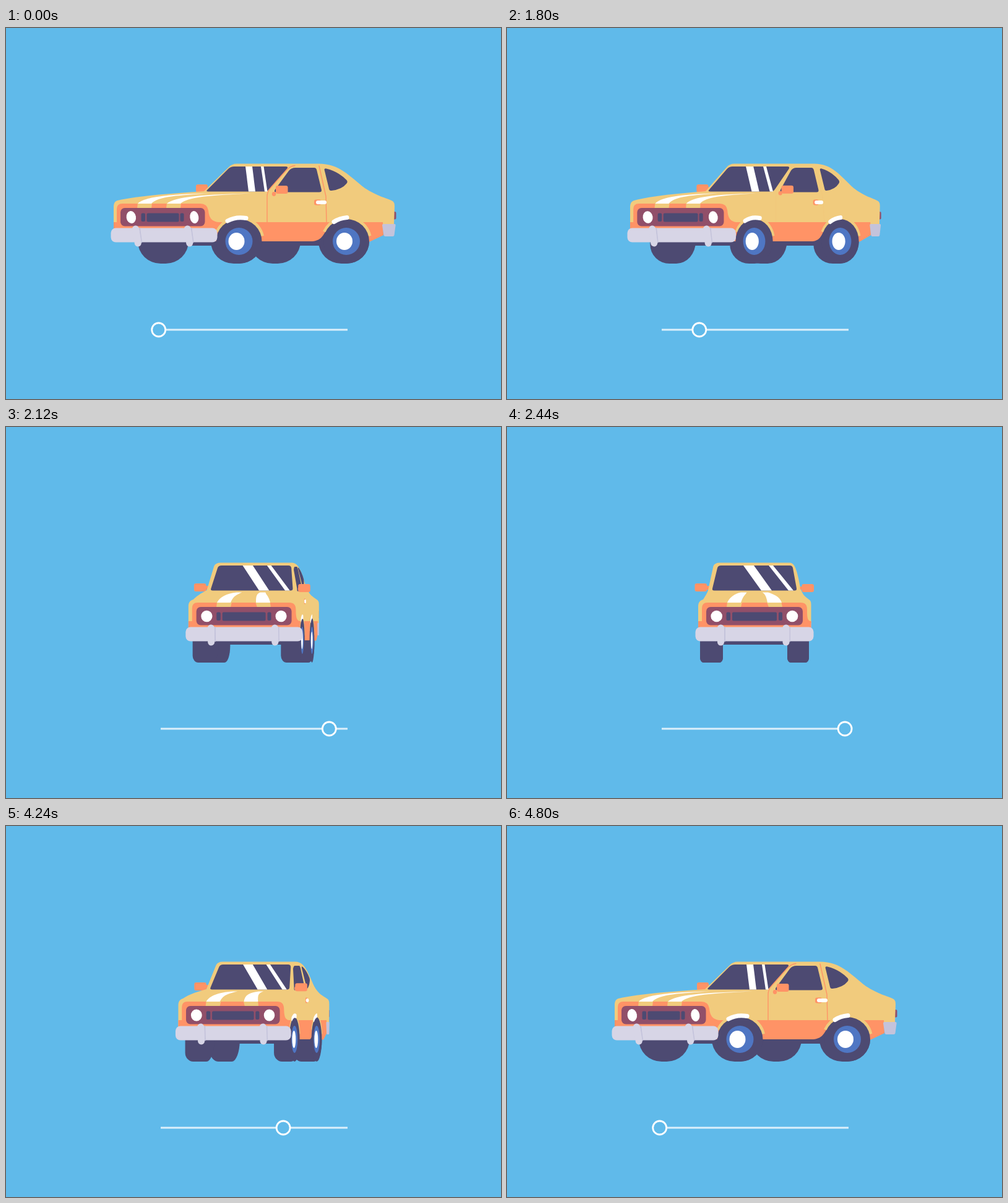
Animation, 800 px wide and 600 px high, one loop 4840 ms. Source, as an HTML page with a canvas:

```html
<!DOCTYPE html>
<html lang="en">
<head>
<meta charset="utf-8">
<title>Turning car</title>
<style>
  html, body { margin: 0; width: 100%; height: 100%; overflow: hidden; background: #60baea; }
  canvas { display: block; width: 800px; height: 600px; }
</style>
</head>
<body>
<canvas id="stage" width="800" height="600"></canvas>
<script>
const ctx = document.getElementById('stage').getContext('2d');
const LOOP = 4840, STEP = 40, TURN = 1000, GO = 1440, BACK = 3800;
const SKY = '#60baea', YELLOW = '#f1cb7d', ORANGE = '#ff9366', DARK = '#4d4a72',
      MAROON = '#914f69', SILVER = '#d7d5e6', SHADE = '#c4c3db', BLUE = '#4f76c3', WHITE = '#fff';

let turn = 0; // 0 = side view, 1 = front view

const mix = (a, b) => a + (b - a) * turn;

// Timing curve from (0,0) to (1,1) with control points (x1,0) and (x2,1)
function ease(u, x1, x2) {
  if (u <= 0) return 0;
  if (u >= 1) return 1;
  let lo = 0, hi = 1;
  for (let i = 0; i < 30; i++) {
    const s = (lo + hi) / 2, r = 1 - s;
    if (3 * r * r * s * x1 + 3 * r * s * s * x2 + s * s * s < u) lo = s; else hi = s;
  }
  return lo * lo * (3 - 2 * lo);
}

// Path text where "a:b" means side value a turning into front value b
const path = d => new Path2D(d.replace(/([\d.]+):([\d.]+)/g, (_, a, b) => mix(+a, +b).toFixed(3)));

function fill(color, d) {
  ctx.fillStyle = color;
  ctx.fill(path(d));
}

function line(color, width, d) {
  ctx.strokeStyle = color;
  ctx.lineWidth = width;
  ctx.stroke(path(d));
}

function box(color, left, right, top, bottom, r) {
  const w = Math.max(0, right - left);
  ctx.fillStyle = color;
  ctx.beginPath();
  ctx.roundRect(left, top, w, bottom - top, Math.min(r, w / 2));
  ctx.fill();
}

function oval(color, x, y, rx, ry, tilt = 0) {
  ctx.fillStyle = color;
  ctx.beginPath();
  ctx.ellipse(x, y, rx, ry, tilt, 0, Math.PI * 2);
  ctx.fill();
}

// Lower half of a tyre with elliptical bottom corners
function tyre(left, right) {
  const rx = mix(37, 6), low = 381, top = 345;
  const ryL = mix(36, 8), ryR = 36 - 28 * turn ** 10;
  ctx.fillStyle = DARK;
  ctx.beginPath();
  ctx.moveTo(left, top);
  ctx.lineTo(left, low - ryL);
  ctx.ellipse(left + rx, low - ryL, rx, ryL, 0, Math.PI, Math.PI / 2, true);
  ctx.lineTo(right - rx, low);
  ctx.ellipse(right - rx, low - ryR, rx, ryR, 0, Math.PI / 2, 0, true);
  ctx.lineTo(right, top);
  ctx.fill();
}

// Arch, side wall and hub, flattened as the car turns
function wheel(x, capShift, shine) {
  if (turn > 0.995) return;
  ctx.save();
  ctx.translate(x, 345);
  ctx.scale(1 - turn, 1);
  ctx.fillStyle = YELLOW;
  ctx.beginPath();
  ctx.moveTo(0, 0);
  ctx.ellipse(0, 0, 41.5, 40.5, 0, Math.PI + 0.42, -0.23);
  ctx.fill();
  oval(DARK, 0, 0, 37, 36);
  oval(BLUE, 0, 0, 22, 22);
  oval(WHITE, capShift, 0, 13, 14);
  ctx.strokeStyle = WHITE;
  ctx.lineWidth = 7;
  ctx.stroke(new Path2D(shine));
  ctx.restore();
}

function underside(bump) {
  box(DARK, mix(285, 335), mix(520, 470), 338, 352, 0);
  tyre(mix(394, 312), mix(476, 349));
  tyre(mix(213, 312), mix(295, 349));
  box(DARK, mix(505, 453), mix(550, 488), 322, 346, 0);
  tyre(mix(505, 453), mix(587, 488));
  tyre(mix(331, 453) + 11 * bump, mix(413.5, 488) + 3.5 * bump);
}

function shell() {
  // far mirror, tail light
  box(ORANGE, mix(307, 303.5), mix(326, 323), 253, 266, 3);
  box(ORANGE, mix(318, 320), mix(326, 328), 257, 263, 1);
  box(MAROON, mix(624, 489), mix(630.5, 491), 297, 309.5, 2);

  fill(YELLOW, `M174:309 325 V291 C174:309 284 175:311 281 180:317 279
    C215:322 271 270:324 267.5 320:325 264 L360:333.5 225 Q365:335.5 219.5 373:344 219.5
    H505:457 C540:467 219.5 555:470 240 580:474 259 C600:477 272 615:483 275 623:488 279
    C627:491 281 628:491.5 283 628:491.5 288 L627:491.5 318 H588:491 V325 Z`);

  // lower side
  fill(ORANGE, `M335:488 314 H609:491.5 L610:491.5 335 L588:491.2 345.5 H550:491 V326 H518:490
    C512:490 337 508:490 345 492:490 345 H335:488 Z`);
  fill(SHADE, `M610:491 317 H628:491.5 Q630:491.5 317 629.5:491.5 320 L627.5:491.5 335
    Q627:491.5 337 625:491.5 337 H613:491 Q611:491 337 610.5:491 335 L608:491 319 Q608:491 317 610:491 317 Z`);

  // front panel
  fill(ORANGE, `M174:309 325 V314 H179:315 V293 Q179:315 284 188:324 284 H314:475
    Q325:485 284 327:485 295 C328:485 306 332:485 314 346:491.3 314 V325 Z`);
}

function hood() {
  fill(YELLOW, 'M213:356 283 H236:380 L235:378 291.5 H212:355 Z');
  fill(YELLOW, 'M260:420 283 H283:443.5 L282:445 291.5 H259:423 Z');
  fill(WHITE, `M213:356 284 C222:360 275 250:369 269 328:378 267.5 L329:387.5 267.5
    C280:386 270.5 246:382 272 235:378 284 Z`);
  fill(WHITE, `M260:421 284 C272:419 273 320:416 269 397:412.5 267.5 L397:422 267.5
    C330:430 270.5 294:440 273 282:444 284 Z`);
}

function glass() {
  fill(DARK, `M327:335 264.5 Q322:331 264.5 326:332 261 L359:340 228 Q363:341 224 369:346 224
    H452:457 Q457:461 224 454:462 228 L425:468 261 Q422:468.5 264.5 418:465 264.5 Z`);
  fill(WHITE, 'M387:382 224 H398:399 L403:428 264.5 H392:411 Z');
  fill(WHITE, 'M412:423 224 H416.5:430 L422.5:463 264.5 H418:455 Z');

  if (turn < 0.995) {
    fill(DARK, `M437:475 265.5 Q432:475 265.5 435:474.5 261 L457:466 231 Q461:466 226 468:466.5 226
      H498:467 Q501:467 226 502:468 229 L510:475 262 Q510.5:475.3 265.5 506:475.2 265.5 Z`);
    fill(DARK, `M514.5:467 229 Q514.5:467 226.5 518:467.5 227.5 C533:469 231 545:472 240 550.5:473 246
      Q553:473.3 249 550:473.5 252 Q543:474 261 526:475 263 Q522.5:475 263.5 522:474.8 260 Z`);
  }

  // door seams
  const seam = 1 - turn * 5.2;
  if (seam > 0) {
    ctx.globalAlpha = seam;
    line(ORANGE, 1.4, `M422:490 314 V273:273 Q422:490 264 428:476 258 L452:468 231
      Q459:467 223 467:466 222.5`);
    line(ORANGE, 1.4, 'M518:490.5 314 L517:480 272 L506:467 223');
    ctx.globalAlpha = 1;
  }

  // near mirror, door handle
  const y = mix(255, 254);
  oval(ORANGE, mix(433, 480), mix(268.5, 261), 3.2, 3.4);
  box(ORANGE, mix(436, 476.5), mix(455.5, 496), y, y + 13, 3);
  box(ORANGE, mix(474, 473.5), mix(455, 479), 258, 263, 1);
  if (turn < 0.995) {
    box(ORANGE, mix(498, 480), mix(509, 480.5), 277.5, 286.5, 3);
    box(WHITE, mix(501, 480), mix(518, 481), 279, 285, 3);
  }
}

function grille() {
  box(MAROON, mix(185, 322), mix(321.5, 478), 291, 320.5, 7);
  box(DARK, mix(227.5, 364), mix(279.5, 436), 299.5, 313.5, 2);
  box(DARK, mix(218.5, 354.5), mix(225, 361), 299.5, 313, 2);
  box(DARK, mix(281.5, 439), mix(287.5, 445), 299.5, 313, 2);
  oval(WHITE, mix(202.3, 338.7), 306, mix(7.7, 9.3), mix(10, 9.3), mix(-0.15, 0));
  oval(WHITE, mix(304.3, 461), 306, mix(7, 9.3), mix(10, 9.3), mix(-0.15, 0));
}

function bumper() {
  box(SILVER, mix(169.5, 304.5), mix(341.5, 495.5), 323.5, 346.5, 8);
  line(SHADE, 2, 'M216:352 324 L219:352 346.5');
  line(SHADE, 2, 'M299.5:457 324 L302.5:457 346.5');
  line(SILVER, 11, 'M209.5:345.5 325 L213.3:345.5 348');
  line(SILVER, 11, 'M293.3:451 325 L296.7:451 348');
}

function slider(k) {
  const x = 246.7 + 299.4 * k;
  box('#dcf0fb', 250, 552, 486.5, 489.5, 0);
  ctx.fillStyle = SKY;
  ctx.strokeStyle = WHITE;
  ctx.lineWidth = 2.8;
  ctx.beginPath();
  ctx.arc(x, 488, 11, 0, Math.PI * 2);
  ctx.fill();
  ctx.stroke();
}

function draw(time) {
  const t = Math.floor((time % LOOP) / STEP) * STEP;
  const out = (t - GO) / TURN, home = (t - BACK) / TURN;
  turn = t < BACK ? ease(out, 0.68, 0.27) : 1 - ease(home, 0.75, 0.4);
  const knob = t < BACK ? ease(out, 0.68, 0.18) : 1 - ease(home, 0.67, 0.335);
  const bump = 4 * turn * (1 - turn);

  ctx.fillStyle = SKY;
  ctx.fillRect(0, 0, 800, 600);
  ctx.lineCap = 'round';
  underside(bump);
  shell();
  hood();
  glass();
  wheel(mix(550, 488), -3, 'M-20 -31.5 Q-11 -37.5 1 -38.5');
  wheel(mix(376.5, 489.4) + 3.5 * bump, -4, 'M-18.5 -33 Q-5 -40.5 11.5 -37.5');
  grille();
  bumper();
  slider(knob);
}

function loop() {
  draw(performance.now());
  requestAnimationFrame(loop);
}
loop();
</script>
</body>
</html>
```
